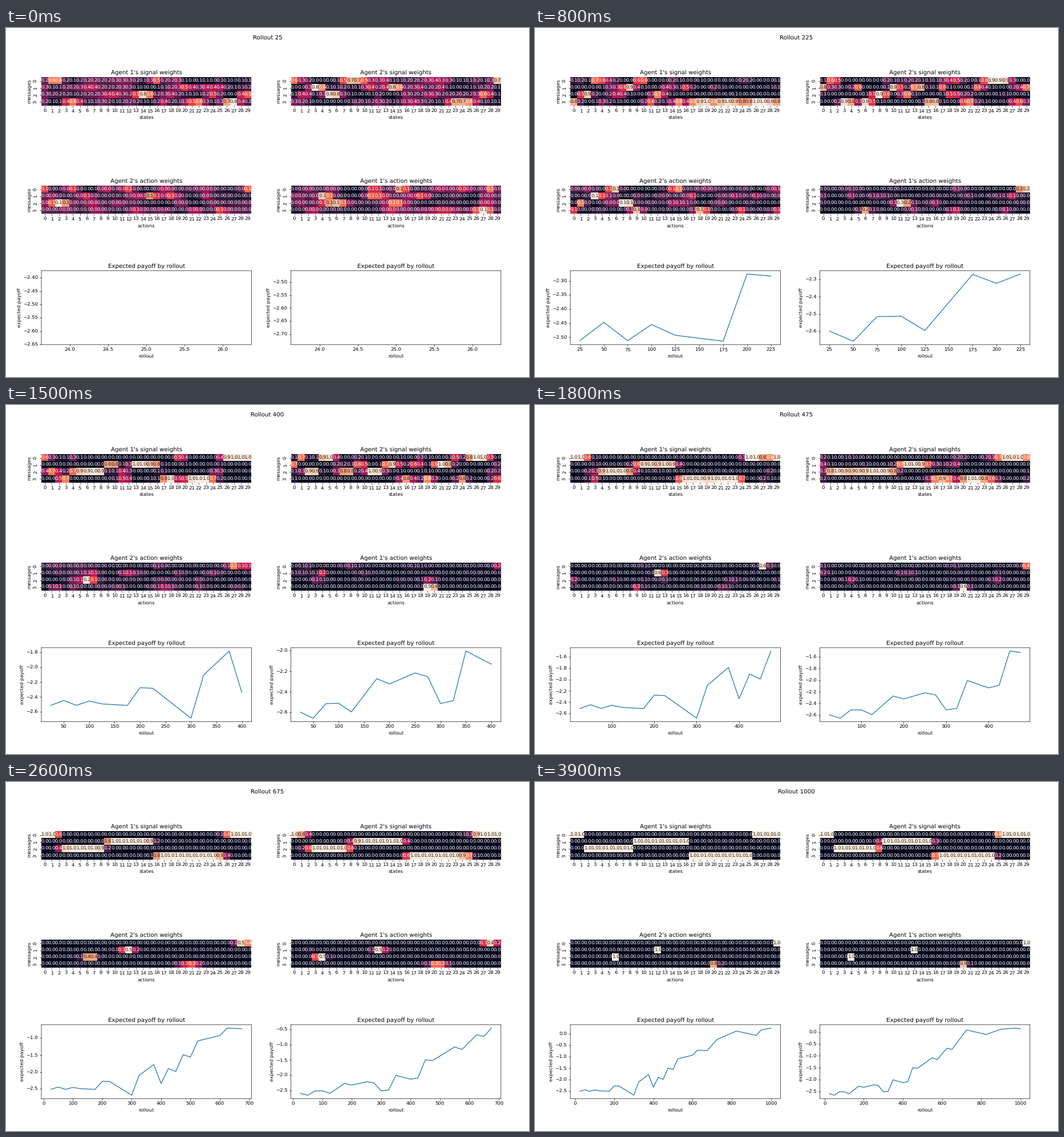
Write a matplotlib script that moves like this. It is 917 px wide and 611 px high and loops after 4 s.

```python
import numpy as np
import matplotlib.pyplot as plt
from matplotlib.animation import FuncAnimation
from matplotlib.colors import LinearSegmentedColormap

W, H, DPI = 917, 611, 61.13
FRAMES, STEP = 40, 25
MESSAGES, CELLS = 4, 30
LEFT, RIGHT, WIDTH = 62.0, 499.5, 368.3

plt.rcParams["text.hinting"] = "none"
plt.rcParams["path.snap"] = False
CMAP = LinearSegmentedColormap.from_list("ember", [
    "#03051a", "#35193e", "#701f57", "#ad1759",
    "#e13342", "#f37651", "#f6b48f", "#faebdd"])

rollouts = STEP * np.arange(1, FRAMES + 1)


def through(*points):
    """Straight segments through (rollout, value) points, sampled at every rollout."""
    x, y = zip(*points)
    return np.interp(rollouts, x, y)


def softmax(logits, axis):
    e = np.exp(logits - logits.max(axis=axis, keepdims=True))
    return e / e.sum(axis=axis, keepdims=True)


def drifting_noise(seed, keep=0.7):
    """Random fields, smooth along the columns, each one a change of the one before."""
    rng = np.random.default_rng(seed)
    field, fields = 0, []
    for i in range(FRAMES):
        raw = rng.normal(size=(MESSAGES, CELLS))
        fresh = (np.roll(raw, 1, 1) + 2 * raw + np.roll(raw, -1, 1)) / np.sqrt(6)
        field = keep * field + np.sqrt(1 - keep ** 2) * fresh if i else fresh
        fields.append(field)
    return np.array(fields)


def signal_weights(bands, seed):
    """Every state picks a message; each message ends up owning one band of states."""
    start, end = np.array(bands).T[..., None]
    offset = np.arange(CELLS) + 0.5 - (start + end) / 2
    distance = np.abs((offset + CELLS / 2) % CELLS - CELLS / 2)
    inside = (end - start) / 2 - distance
    pull = through((25, 0), (125, 0.05), (400, 0.3), (575, 1), (675, 1.4), (1000, 7))
    spread = through((25, 0.9), (125, 2.2), (400, 2), (575, 1.2), (1000, 0.2))
    logits = pull[:, None, None] * inside + spread[:, None, None] * drifting_noise(seed)
    return softmax(logits, axis=1)


def action_weights(peaks, seed):
    """Every message picks an action; each row sharpens around its own peak."""
    distance = np.abs(np.arange(CELLS) - np.array(peaks)[:, None])
    closeness = -np.minimum(distance, 3) ** 2
    pull = through((25, 0), (125, 0.03), (400, 0.15), (575, 0.5), (675, 0.6), (1000, 6))
    spread = through((25, 0.55), (125, 1.3), (400, 1.4), (575, 1.2), (1000, 0.1))
    logits = pull[:, None, None] * closeness + spread[:, None, None] * drifting_noise(seed)
    return softmax(logits, axis=2)


signal_1 = signal_weights([(26, 32), (9, 17), (2, 9), (17, 26)], seed=11)
signal_2 = signal_weights([(25.44, 32), (8.53, 16.5), (2, 8.53), (16.5, 25.44)], seed=23)
action_1 = action_weights([29, 13, 4, 20.33], seed=41)
action_2 = action_weights([29, 12, 6, 20.36], seed=37)

payoff_left = through(
    (25, -2.512), (50, -2.447), (75, -2.512), (100, -2.455), (125, -2.493), (175, -2.514),
    (200, -2.276), (225, -2.283), (300, -2.685), (325, -2.105), (375, -1.784), (400, -2.339),
    (425, -1.9), (450, -1.99), (475, -1.493), (500, -1.563), (525, -1.088), (600, -0.93),
    (625, -0.71), (675, -0.73), (725, -0.24), (825, 0.13), (925, -0.065), (950, 0.175), (1000, 0.26))
payoff_right = through(
    (25, -2.598), (50, -2.656), (75, -2.515), (100, -2.512), (125, -2.595), (175, -2.273),
    (200, -2.324), (250, -2.218), (275, -2.253), (300, -2.514), (325, -2.487), (350, -2.006),
    (400, -2.133), (425, -2.088), (450, -1.498), (475, -1.521), (550, -1.078), (575, -1.159),
    (625, -0.676), (650, -0.733), (725, 0.09), (825, -0.1), (900, 0.12), (975, 0.17), (1000, 0.14))

fig = plt.figure(figsize=((W + 1e-6) / DPI, (H + 1e-6) / DPI), dpi=DPI, facecolor="white")
heading = fig.suptitle("Rollout 25")


def panel(x, y, height, title, xlabel, ylabel):
    ax = fig.add_axes((x / W, 1 - (y + height) / H, WIDTH / W, height / H))
    ax.set(title=title, xlabel=xlabel, ylabel=ylabel)
    return ax


def is_light(rgba):
    rgb = rgba[..., :3]
    linear = np.where(rgb <= 0.03928, rgb / 12.92, ((rgb + 0.055) / 1.055) ** 2.4)
    return linear @ np.array([0.2126, 0.7152, 0.0722]) > 0.408


class Heatmap:
    def __init__(self, weights, x, y, title, xlabel):
        self.weights = weights
        ax = panel(x, y, WIDTH * MESSAGES / CELLS, title, xlabel, "messages")
        self.mesh = ax.pcolormesh(weights[0], cmap=CMAP)
        ax.set(xlim=(0, CELLS), ylim=(MESSAGES, 0))
        ax.set_xticks(np.arange(CELLS) + 0.5, range(CELLS))
        ax.set_yticks(np.arange(MESSAGES) + 0.5, range(MESSAGES), rotation=90, va="center")
        ax.spines[:].set_visible(False)
        self.labels = [ax.text(c + 0.5, r + 0.5, "", ha="center", va="center")
                       for r in range(MESSAGES) for c in range(CELLS)]

    def show(self, i):
        w = self.weights[i]
        self.mesh.set_array(w)
        self.mesh.set_clim(w.min(), w.max())
        light = is_light(CMAP(self.mesh.norm(w)))
        for label, value, on_light in zip(self.labels, w.flat, light.flat):
            label.set_text(f"{value:.1f}")
            label.set_color("0.15" if on_light else "white")


class Payoff:
    def __init__(self, values, x):
        self.values = values
        self.ax = panel(x, 424.9, 129.3, "Expected payoff by rollout", "rollout", "expected payoff")
        self.line, = self.ax.plot([], [], color="C0")

    def show(self, i):
        self.line.set_data(rollouts[:i + 1], self.values[:i + 1])
        self.ax.relim()
        self.ax.autoscale_view()


views = [
    Heatmap(signal_1, LEFT, 86.4, "Agent 1's signal weights", "states"),
    Heatmap(signal_2, RIGHT, 86.4, "Agent 2's signal weights", "states"),
    Heatmap(action_2, LEFT, 276.2, "Agent 2's action weights", "actions"),
    Heatmap(action_1, RIGHT, 276.2, "Agent 1's action weights", "actions"),
    Payoff(payoff_left, LEFT),
    Payoff(payoff_right, RIGHT),
]


def update(i):
    heading.set_text(f"Rollout {rollouts[i]}")
    for view in views:
        view.show(i)
    return []


anim = FuncAnimation(fig, update, frames=FRAMES, init_func=lambda: update(0),
                     interval=100, repeat=True, repeat_delay=0, blit=False)
plt.show()
```
